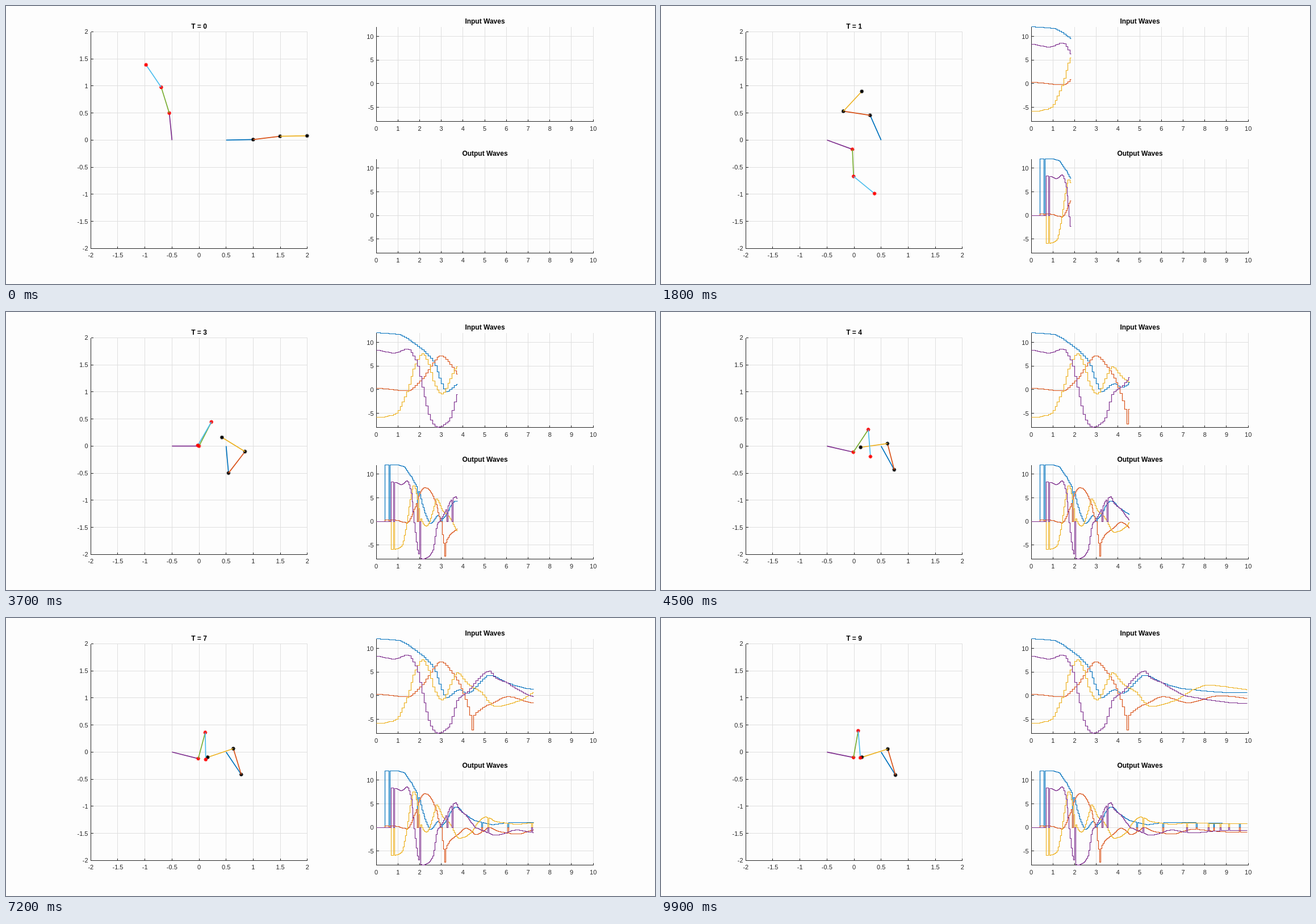
Write an HTML page that moves like this. It is 1143 px wide and 490 px high and loops after 10000 ms.

```html
<!DOCTYPE html>
<html lang="en">
<head>
<meta charset="utf-8">
<title>Two arms with wave plots</title>
<style>
html, body { margin: 0; width: 100%; height: 100%; overflow: hidden; background: #fdfdfd; }
svg { display: block; width: 1143px; height: 490px; }
text { font: 11px "Liberation Sans", Arial, sans-serif; fill: #262626; }
.title { font-size: 12px; font-weight: bold; fill: #000; text-anchor: middle; }
.grid { stroke: #dfdfdf; shape-rendering: crispEdges; }
.axis { stroke: #262626; fill: none; shape-rendering: crispEdges; }
.wave { fill: none; stroke-width: 1.2; }
.link { stroke-width: 1.7; }
.star { fill: none; stroke-width: 1.5; }
</style>
</head>
<body>
<svg id="stage" viewBox="0 0 1143 490"></svg>
<script>
const NS = "http://www.w3.org/2000/svg";
const stage = document.getElementById("stage");
const COLORS = ["#0072bd", "#d95319", "#edb120", "#7e2f8e", "#77ac30", "#4dbeee"];
const STEP = .05;

// Shape-preserving cubic through key points
function spline(xs, ys) {
  const n = xs.length;
  const slope = i => (ys[i + 1] - ys[i]) / (xs[i + 1] - xs[i]);
  const m = xs.map((_, i) => {
    if (i === 0 || i === n - 1) return 0;
    const a = slope(i - 1), b = slope(i);
    return a * b > 0 ? 2 * a * b / (a + b) : 0;
  });
  return x => {
    if (x <= xs[0]) return ys[0];
    if (x >= xs[n - 1]) return ys[n - 1];
    let i = 0;
    while (xs[i + 1] < x) i++;
    const h = xs[i + 1] - xs[i], s = (x - xs[i]) / h, r = 1 - s;
    return r * r * ((1 + 2 * s) * ys[i] + s * h * m[i]) +
           s * s * ((1 + 2 * r) * ys[i + 1] - r * h * m[i + 1]);
  };
}

// Key points as time, value pairs
const curve = (...keys) => spline(keys.filter((_, i) => i % 2 === 0), keys.filter((_, i) => i % 2));

// Turning points and bends of the four signals, in receiver time
const signals = [
  curve(0,12, 1,11.7, 1.85,9.5, 2.65,6, 2.95,2.5, 3.25,-.4, 3.85,1.3, 4.2,.5, 5.25,4.3, 6,2.8, 7,1.5,
    9.5,.6, 11.5,1.1, 14.5,.85),
  curve(0,.3, 1.45,-.25, 2.2,2.6, 3,7.15, 3.5,5, 4.05,.4, 4.35,-4.2, 4.45,-7.3, 4.55,-4.1, 5.4,-1.5, 6.1,-.2,
    7.2,-1.5, 8.7,-.05, 11.5,-1.4, 12.8,-.4, 14.5,-1),
  curve(0,-5.9, .85,-5.3, 1.4,-1, 1.8,4.9, 2.15,7.6, 2.45,5.3, 2.7,1.2, 3.05,-.95, 3.4,1.8, 3.75,4.8, 4.3,2.2,
    4.8,.9, 5.5,-2.3, 6.6,-1.1, 7.5,1.3, 8.15,2.2, 10,1.25, 11.5,.7, 12.5,.95, 14.5,.8),
  curve(0,8.35, .85,7.75, 1.45,8.6, 1.85,6.3, 2.25,-1.5, 2.55,-6.5, 2.85,-8, 3.4,-6.4, 3.8,-.6, 4.1,.3, 5.25,5.2,
    5.5,3.8, 6,2.8, 6.8,.6, 7.2,-.1, 10,-1.65, 11.5,-.55, 12.7,-1.15, 14.5,-.6)
];

// When a sample sent at a given time is received: the delay keeps growing
const arrival = curve(.7,0, 1.15,.85, 1.4,1.45, 1.73,2.15, 2.1,2.85, 2.45,3.22, 3.15,4.45, 3.65,5.25,
  4.1,6.05, 4.6,7.2, 5.15,8.6, 5.5,10, 10,14.5);

// Two channels, silent until they start and losing a sample now and then
const channels = [
  { start: .4, losses: [.6, 1.9, 3, 4.85, 6.05, 7.6, 8.4, 9.6] },
  { start: .7, losses: [.8, 2, 3.25, 3.5, 4.55, 5.15, 7.15, 8.15, 8.7, 9.1] }
];
const isSilent = (ch, t) => t < ch.start - .001 || ch.losses.some(s => Math.abs(s - t) < STEP / 2);

// Link angles in degrees at the key poses
const POSE_TIMES = [0, 1.8, 3, 4.5, 5.5, 7.2, 9.9];
const arms = [
  { base: .5, ink: "#000", colors: COLORS.slice(0, 3), angles: [
    [1, 114, 235.7, 299, 302, 304, 302],
    [7, 171.3, 333, 464.5, 467.2, 467, 466.5],
    [1, 47, 104.5, 188, 202, 198.6, 197.5]] },
  { base: -.5, ink: "#f00", colors: COLORS.slice(3), angles: [
    [95.7, -20, 8.7, -13, -17, -14, -11.5],
    [107.3, -87.5, 68, 56.5, 67.8, 75, 80],
    [124.2, -39.3, 176.6, 274.6, 268.2, 271, 274.6]] }
];

function add(name, attrs, parent = stage) {
  const el = document.createElementNS(NS, name);
  for (const key in attrs) el.setAttribute(key, attrs[key]);
  parent.appendChild(el);
  return el;
}

function label(x, y, str, attrs) {
  const el = add("text", { x, y, ...attrs });
  el.textContent = str;
  return el;
}

const snap = v => Math.floor(v) + .5;
const range = (from, to, step) =>
  Array.from({ length: Math.round((to - from) / step) + 1 }, (_, i) => from + i * step);

function makeAxes(a) {
  const X = v => a.x0 + v * a.sx, Y = v => a.y0 - v * a.sy;
  const left = snap(X(a.xmin)), right = snap(X(a.xmax));
  const top = snap(Y(a.ymax)), bottom = snap(Y(a.ymin));
  let grid = "", axis = `M${left} ${top}V${bottom}H${right}`;
  for (const v of a.xticks) {
    const x = snap(X(v));
    grid += `M${x} ${top}V${bottom}`;
    axis += `M${x} ${bottom}v-4`;
    label(X(v), a.labelY, v, { "text-anchor": "middle" });
  }
  for (const v of a.yticks) {
    const y = snap(Y(v));
    grid += `M${left} ${y}H${right}`;
    axis += `M${left} ${y}h4`;
    label(left - 5, Math.round(Y(v) + 4), v, { "text-anchor": "end" });
  }
  add("path", { class: "grid", d: grid });
  add("path", { class: "axis", d: axis });
  const title = label((left + right) / 2, a.titleY, a.title, { class: "title" });
  const clip = add("clipPath", { id: a.id });
  add("rect", { x: left - .5, y: top - .5, width: right - left + 1, height: bottom - top + 1 }, clip);
  return { X, Y, title, id: a.id };
}

const halves = range(-2, 2, .5);
const room = makeAxes({ id: "room", x0: 340, sx: 95.35, y0: 236.3, sy: 95.5, xmin: -2, xmax: 2, ymin: -2, ymax: 2,
  xticks: halves, yticks: halves, labelY: 443, titleY: 40, title: "T = 0" });

const plot = (id, y0, labelY, titleY, title) => makeAxes({ id, y0, labelY, titleY, title,
  x0: 652, sx: 38.22, sy: 8.33, xmin: 0, xmax: 10, ymin: -8, ymax: 12,
  xticks: range(0, 10, 1), yticks: [-5, 0, 5, 10] });
const inPlot = plot("in", 136.85, 220, 31, "Input Waves");
const outPlot = plot("out", 369.2, 452, 264, "Output Waves");

// Draws a signal as steps; valueAt takes the sample number
function makeWave(axes, color, valueAt) {
  const group = add("g", { "clip-path": `url(#${axes.id})` });
  const path = add("path", { class: "wave", stroke: color }, group);
  const ys = range(0, 199, 1).map(k => snap(axes.Y(valueAt(k))));
  return steps => {
    let d = "";
    for (let k = 0; k < steps; k++) {
      d += (k ? "V" + ys[k] : `M${snap(axes.X(0))} ${ys[k]}`) + "H" + snap(axes.X((k + 1) * STEP));
    }
    path.setAttribute("d", d);
  };
}

const received = f => k => f((Math.floor(k / 2) * 2 + 1) * STEP);
const sent = (f, ch) => k => isSilent(ch, k * STEP) ? 0 : f(arrival(k * STEP));
const waves = [
  ...signals.map((f, i) => makeWave(inPlot, COLORS[i], received(f))),
  ...signals.map((f, i) => makeWave(outPlot, COLORS[i], sent(f, channels[i >> 1])))
];

const STAR = "M-3.4 0H3.4M0-3.4V3.4M-2.4-2.4L2.4 2.4M-2.4 2.4L2.4-2.4";
for (const arm of arms) {
  arm.links = arm.angles.map((list, i) => ({
    angle: spline(POSE_TIMES, list),
    line: add("line", { class: "link", stroke: arm.colors[i] }),
    star: add("path", { class: "star", stroke: arm.ink, d: STAR })
  }));
}

function poseArm(arm, t) {
  let x = arm.base, y = 0;
  for (const { angle, line, star } of arm.links) {
    const a = angle(t) * Math.PI / 180;
    line.setAttribute("x1", room.X(x));
    line.setAttribute("y1", room.Y(y));
    x += .5 * Math.cos(a);
    y += .5 * Math.sin(a);
    line.setAttribute("x2", room.X(x));
    line.setAttribute("y2", room.Y(y));
    star.setAttribute("transform", `translate(${room.X(x)} ${room.Y(y)})`);
  }
}

let shown = -1;
function draw(now) {
  const tick = Math.floor(now / 100) % 100;
  if (tick === shown) return;
  shown = tick;
  room.title.textContent = "T = " + Math.floor(tick / 10);
  arms.forEach(arm => poseArm(arm, tick / 10));
  waves.forEach(wave => wave(tick ? tick * 2 + 1 : 0));
}

const start = performance.now();
function loop() {
  draw(performance.now() - start);
  requestAnimationFrame(loop);
}
loop();
</script>
</body>
</html>
```
